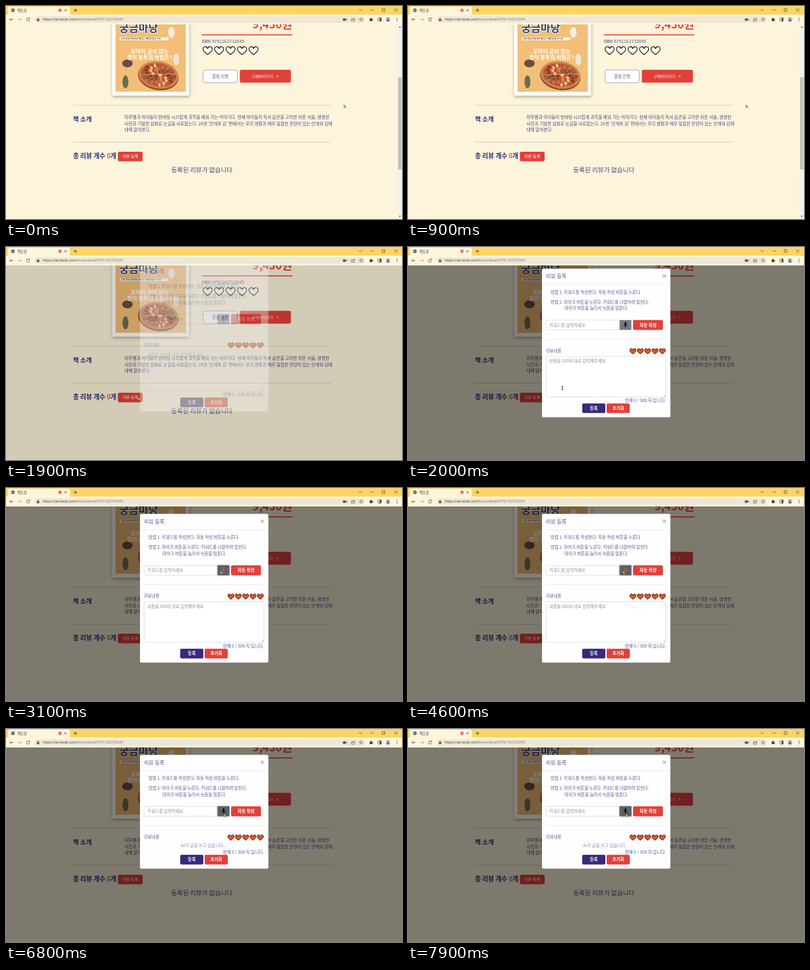
Write an HTML page with a canvas that moves like this. It is 600x323 px and loops after 8000 ms.

```html
<!DOCTYPE html>
<html lang="ko">
<head>
<meta charset="utf-8">
<title>책또랑</title>
<style>
html, body { margin: 0; width: 100%; height: 100%; overflow: hidden; background: #fcf4db; }
canvas { display: block; width: 600px; height: 323px; }
</style>
</head>
<body>
<canvas id="stage"></canvas>
<script>
const W = 600, H = 323, LOOP = 8000;
const OPEN = 1850, RECORD = 2950, STOP = 6350, WRITING = 6500;
const KR = '"Noto Sans CJK KR", "Noto Sans CJK", sans-serif';
const UI = '"Open Sans", sans-serif';
const PAGE = '#fcf4db', NAVY = '#30297a', BODY = '#4d4783', PURPLE = '#5b5296', RED = '#e2403a', INK = '#4f4a40';

const scale = window.devicePixelRatio || 1;

function prepare(canvas) {
  canvas.width = W * scale;
  canvas.height = H * scale;
  const ctx = canvas.getContext('2d');
  ctx.scale(scale, scale);
  return ctx;
}

const stage = prepare(document.getElementById('stage'));
const layer = prepare(document.createElement('canvas'));
let c = stage;

const clamp = v => Math.max(0, Math.min(1, v));
const easeInOut = p => p * p * (3 - 2 * p);

function text(s, x, y, size, color, { weight = 400, align = 'left', font = KR } = {}) {
  c.font = `${weight} ${size}px ${font}`;
  c.textAlign = align;
  c.fillStyle = color;
  c.fillText(s, x, y);
}

function box(x, y, w, h, fill, r = 0, stroke, lw = 0.7) {
  c.beginPath();
  c.roundRect(x, y, w, h, r);
  if (fill) { c.fillStyle = fill; c.fill(); }
  if (stroke) { c.strokeStyle = stroke; c.lineWidth = lw; c.stroke(); }
}

function oval(x, y, rx, ry, fill, angle = 0) {
  c.beginPath();
  c.ellipse(x, y, rx, ry, angle, 0, 7);
  c.fillStyle = fill;
  c.fill();
}

function ring(x, y, r, color, lw = 0.8) {
  c.beginPath();
  c.arc(x, y, r, 0, 7);
  c.strokeStyle = color;
  c.lineWidth = lw;
  c.stroke();
}

function line(color, lw, ...p) {
  c.beginPath();
  for (let i = 0; i < p.length; i += 2) c.lineTo(p[i], p[i + 1]);
  c.strokeStyle = color;
  c.lineWidth = lw;
  c.stroke();
}

function poly(fill, ...p) {
  c.beginPath();
  for (let i = 0; i < p.length; i += 2) c.lineTo(p[i], p[i + 1]);
  c.closePath();
  c.fillStyle = fill;
  c.fill();
}

function button(label, x, y, w, h, fill, size, { color = '#fff', weight = 500, r = 2, stroke } = {}) {
  box(x, y, w, h, fill, r, stroke);
  text(label, x + w / 2, y + h / 2 + size * 0.37, size, color, { weight, align: 'center' });
}

function heart(x, y, w, fill, lw) {
  const k = w / 2;
  c.beginPath();
  c.moveTo(x, y + k * 0.88);
  c.bezierCurveTo(x - k * 0.5, y + k * 0.5, x - k, y + k * 0.15, x - k, y - k * 0.3);
  c.bezierCurveTo(x - k, y - k, x - k * 0.2, y - k * 1.05, x, y - k * 0.42);
  c.bezierCurveTo(x + k * 0.2, y - k * 1.05, x + k, y - k, x + k, y - k * 0.3);
  c.bezierCurveTo(x + k, y + k * 0.15, x + k * 0.5, y + k * 0.5, x, y + k * 0.88);
  c.closePath();
  c.fillStyle = fill;
  c.fill();
  c.strokeStyle = '#15110f';
  c.lineWidth = lw;
  c.lineJoin = 'round';
  c.stroke();
}

function drawBrowser() {
  box(0, 0, W, 13.5, '#fbd463');
  box(3, 1, 94, 16, '#fef5dc', 3);
  box(0, 13, W, 15, '#fef5dc');
  oval(10.5, 6.5, 2.8, 2.8, '#5c5f63');
  line('#fef5dc', 0.5, 8, 6.5, 13, 6.5);
  text('책또랑', 17, 8.5, 5.3, '#3c3a36');
  ring(81.8, 6.5, 2.4, '#d9453a', 0.7);
  oval(81.8, 6.5, 1.4, 1.4, '#d9453a');
  line(INK, 0.8, 88.5, 4.8, 91.9, 8.2);
  line(INK, 0.8, 91.9, 4.8, 88.5, 8.2);
  line(INK, 0.9, 102.5, 6.5, 108, 6.5);
  line(INK, 0.9, 105.2, 3.8, 105.2, 9.2);

  line(INK, 0.7, 534.5, 5, 536.8, 7.3, 539, 5);
  line(INK, 0.7, 552.5, 6, 557.5, 6);
  box(570, 4, 4, 4, null, 0, INK);
  line(INK, 0.7, 588, 3.6, 593, 8.6);
  line(INK, 0.7, 593, 3.6, 588, 8.6);

  line(INK, 0.75, 11.2, 20.5, 5.8, 20.5);
  line(INK, 0.75, 8, 18.3, 5.8, 20.5, 8, 22.7);
  line('#aaa391', 0.75, 18.3, 20.5, 23.7, 20.5);
  line('#aaa391', 0.75, 21.5, 18.3, 23.7, 20.5, 21.5, 22.7);
  c.beginPath();
  c.arc(33.5, 20.5, 2.4, 0.2, 5.4);
  c.strokeStyle = INK;
  c.lineWidth = 0.75;
  c.stroke();
  poly(INK, 34.2, 19.8, 36.3, 19.8, 36.3, 17.6);

  box(43.5, 15.5, 500, 10, '#eee7d5', 5);
  box(46.8, 19.8, 3.6, 3.2, '#5d5a52', 0.5);
  ring(48.6, 19.4, 1.2, '#5d5a52', 0.6);
  text('https://ae-book.com', 56, 22.4, 5.3, '#37352f', { font: UI });
  const host = c.measureText('https://ae-book.com').width;
  text('/book/detail/9791162732045', 56 + host, 22.4, 5.3, '#77736a', { font: UI });

  box(510.5, 18.8, 4, 3.6, '#55524b', 0.6);
  poly('#55524b', 514, 20.6, 516.3, 19, 516.3, 22.2);
  box(523.5, 19.5, 4.5, 3.5, null, 0, '#55524b');
  line('#55524b', 0.7, 525, 21, 528.5, 17.8);
  const star = [];
  for (let i = 0; i < 11; i++) {
    const r = i % 2 ? 1.3 : 2.8, a = i * Math.PI / 5 - Math.PI / 2;
    star.push(538 + r * Math.cos(a), 20.5 + r * Math.sin(a));
  }
  line('#55524b', 0.6, ...star);
  box(551, 19, 4, 4, '#4c4942', 0.8);
  oval(553, 18.8, 1, 1, '#4c4942');
  oval(555.2, 21, 1, 1, '#4c4942');
  box(563.5, 18, 5, 5, null, 0.5, '#4c4942');
  box(566, 18, 2.5, 5, '#4c4942');
  oval(578.8, 20.5, 3.8, 3.8, '#c6d3dd');
  oval(578.8, 19.4, 1.3, 1.3, '#52677c');
  box(576.6, 21, 4.4, 2.3, '#52677c', 1);
  for (let i = 0; i < 3; i++) oval(592.5, 18.4 + i * 2.1, 0.65, 0.65, INK);
}

function drawCover() {
  c.save();
  c.shadowColor = 'rgba(60,45,25,.45)';
  c.shadowBlur = 5 * scale;
  c.shadowOffsetY = 1.5 * scale;
  box(160.5, 10, 117, 126, '#fffdf8');
  c.restore();
  box(166, 20, 106.5, 110, '#f3be78');

  c.font = `700 16px ${KR}`;
  c.textAlign = 'left';
  c.lineWidth = 1.6;
  c.strokeStyle = '#fff';
  c.strokeText('궁금마당', 171.5, 38.5);
  text('궁금마당', 171.5, 38.5, 16, '#343c63', { weight: 700 });
  box(172, 47.5, 74, 4.6, '#fffaf0');
  text('우리 동네 이야기로 배우는 재미난 탐구 시간', 174, 51, 3.4, '#514a48', { weight: 700 });

  oval(250.5, 40, 5, 8, '#f4eee4');
  oval(258, 81, 4.5, 9, '#ede5d5');
  oval(184, 87, 8, 6, '#674e42');
  oval(181, 115, 4.5, 10, '#68704a');
  text('호떡이 굳지 않는', 217.5, 72, 8.4, '#fff', { weight: 700, align: 'center' });
  text('종이 봉투의 마법은?', 217.5, 81, 8.2, '#fff', { weight: 700, align: 'center' });

  c.save();
  c.translate(231, 104.5);
  c.rotate(0.16);
  oval(0, 2, 31, 21, '#8e4f30');
  oval(0, 0, 30.5, 20.5, '#c9874f');
  oval(0, 0, 27, 17.5, '#bd5638');
  for (let i = 0; i < 36; i++) {
    const a = i * 2.4, r = Math.sqrt((i + 0.5) / 36);
    const tone = ['#efc88a', '#8c2f22', '#5f6238', '#d9714a'][i % 4];
    oval(25 * r * Math.cos(a), 15.5 * r * Math.sin(a), 2.7, 1.8, tone, a);
  }
  line('#f1cf8d', 0.7, -26, 4, 26, -6);
  line('#f1cf8d', 0.7, -9, -17, 11, 17);
  c.restore();
}

function drawPage(scrollbar) {
  box(0, 28, W, H - 28, PAGE);
  drawCover();

  text('9,430원', 433.5, 34, 16.7, RED, { weight: 700, align: 'right' });
  line(RED, 1.5, 296.5, 43.8, 434, 43.8);
  text('ISBN', 296.5, 55.5, 6, NAVY, { weight: 500 });
  text('9791162732045', 312, 55.5, 6.8, BODY);
  for (let i = 0; i < 5; i++) heart(305.5 + i * 17.4, 67.6, 13.8, '#fffaee', 1.1);
  button('알림 신청', 298.8, 97, 51.6, 19.2, '#fffefb', 6.4, { color: PURPLE, weight: 400, r: 2.5, stroke: '#8d87b5' });
  box(354.3, 96.7, 77.4, 19.6, RED, 2.5);
  text('구매하러가기', 372, 108.8, 6, '#fff', { weight: 500 });
  line('#fff', 0.6, 409.3, 106.7, 412.8, 106.7);
  line('#fff', 0.6, 411.6, 105.6, 412.8, 106.7, 411.6, 107.8);

  line('#d3cac6', 0.8, 101.5, 150.4, 492, 150.4);
  text('책 소개', 101.5, 174.6, 9.5, NAVY, { weight: 700 });
  [
    '마루쌤과 아이들이 한바탕 시끄럽게 과학을 배워 가는 이야기다. 현재 아이들의 독서 습관을 고려한 쉬운 서술, 생생한',
    "사진과 기발한 삽화로 눈길을 사로잡는다. 29권 '안개와 김' 편에서는 우리 생활과 매우 밀접한 관련이 있는 안개와 김에",
    '대해 알아본다.'
  ].forEach((s, i) => text(s, 179.5, 171.2 + i * 9.4, 6.58, BODY));
  line('#d3cac6', 0.8, 101.5, 206.5, 492, 206.5);

  let x = 101.5;
  for (const [s, color] of [['총 리뷰 개수 ', NAVY], ['0', '#e8532f'], ['개', NAVY]]) {
    text(s, x, 231.4, 9.7, color, { weight: 700 });
    x += c.measureText(s).width;
  }
  button('리뷰 등록', 169.5, 221, 37.5, 14.4, RED, 6.2, { weight: 400, r: 2.2 });
  text('등록된 리뷰가 없습니다', 296.7, 252.4, 9.65, BODY, { align: 'center' });

  if (scrollbar) {
    box(593.5, 28, 6.5, H - 28, '#f3f1ec');
    box(594, 108, 5.5, 140, '#c3c1bd');
    poly('#55534f', 595.2, 33, 598.4, 33, 596.8, 31);
    poly('#55534f', 595.2, 318, 598.4, 318, 596.8, 320);
  }
}

function drawMic(color) {
  box(328, 120.3, 3, 5.4, color, 1.5);
  c.beginPath();
  c.arc(329.5, 124.4, 2.6, 0, Math.PI);
  c.strokeStyle = color;
  c.lineWidth = 0.8;
  c.stroke();
  line(color, 0.9, 329.5, 127, 329.5, 128.8);
}

function drawModal(t) {
  const writing = t >= WRITING;
  const dy = writing ? -53 : 0;
  const focused = t >= RECORD;

  box(203, 39.2, 194.5, 225.6 + dy, '#fffefe', 2);
  text('리뷰 등록', 209, 54, 8, PURPLE, { weight: 500 });
  line('#716d78', 0.9, 386.2, 48.2, 390.6, 52.6);
  line('#716d78', 0.9, 390.6, 48.2, 386.2, 52.6);
  line('#e4e2e7', 0.6, 203, 63.5, 397.5, 63.5);

  text('방법 1. 키워드를 작성한다. 자동 작성 버튼을 누른다.', 216, 77.2, 6.45, PURPLE);
  text('방법 2. 마이크 버튼을 누른다. 키워드를 나열하며 말한다.', 216, 92.4, 6.45, PURPLE);
  text('마이크 버튼을 눌러서 녹음을 멈춘다.', 237, 102, 6.45, PURPLE);

  box(209.3, 117.4, 111.5, 14.8, '#fff', 1.5, '#d2d4da');
  text('키워드를 입력하세요.', 214, 127.2, 6.4, '#8b8d96');
  if (focused) box(319.4, 116.2, 20, 17.2, '#c0c4c8', 2);
  box(320.6, 117.3, 17.8, 15, focused ? '#596068' : '#747b83', 1);
  drawMic(t >= RECORD && t < STOP ? '#e5402f' : '#101114');
  button('자동 작성', 341, 117.2, 45.3, 15.2, RED, 6.6, { weight: 700 });
  line('#e4e2e7', 0.6, 209, 146.5, 391, 146.5);

  text('리뷰내용', 209, 166.2, 6.3, PURPLE);
  for (let i = 0; i < 5; i++) heart(340.8 + i * 11.15, 164.6, 9.2, '#f4511e', 0.9);

  if (writing) {
    text('AI가 글을 쓰고 있습니다...', 300, 179.4, 6.5, '#8a84b4', { align: 'center' });
  } else {
    box(209.3, 172.6, 181.6, 61.4, '#fff', 1.5, '#d2d4da');
    text('내용을 300자 내로 입력해주세요.', 214, 181.8, 6.4, '#8b8d96');
    line('#777', 0.5, 387.5, 233, 390, 230.5);
    line('#777', 0.5, 389, 233, 390, 232);
  }
  text('현재 0 / 300 자 입니다.', 391, 241.5 + dy, 6.55, PURPLE, { align: 'right' });
  button('등록', 264, 243.8 + dy, 35, 14.6, '#372a7c', 6.4, { weight: 700, r: 1.8 });
  button('초기화', 301, 243.8 + dy, 35, 14.6, RED, 6.4, { weight: 700, r: 1.8 });
}

// Pointer stops: time, x, y
const path = [
  [0, 513, 152], [1000, 513, 152], [1750, 201, 230], [1900, 201, 230], [2000, 234, 214],
  [2250, 234, 214], [2850, 326, 128], [6200, 327, 128], [6450, 331, 131], [LOOP, 331, 131]
];

function pointerAt(t) {
  let i = 1;
  while (i < path.length - 1 && path[i][0] < t) i++;
  const [t0, x0, y0] = path[i - 1], [t1, x1, y1] = path[i];
  const p = easeInOut(clamp((t - t0) / (t1 - t0)));
  return [x0 + (x1 - x0) * p, y0 + (y1 - y0) * p];
}

function drawPointer(t) {
  const [x, y] = pointerAt(t);
  const inField = t > OPEN + 140 && x > 209 &&
    ((x < 391 && y > 172 && y < 234) || (x < 320 && y > 117 && y < 132));
  if (inField) {
    line('#222', 0.9, x, y - 2.6, x, y + 2.6);
    line('#222', 0.7, x - 1.5, y - 2.7, x + 1.5, y - 2.7);
    line('#222', 0.7, x - 1.5, y + 2.7, x + 1.5, y + 2.7);
    return;
  }
  const shape = [-1, -2, -0.6, 2, 0.3, 1.2, 1.4, 2.6, 2, 2, 1.1, 0.7, 2, 0.2];
  c.save();
  c.translate(x, y);
  c.lineJoin = 'round';
  line('#4a5420', 0.9, ...shape, shape[0], shape[1]);
  poly('#c8d820', ...shape);
  c.restore();
}

// Solves the ease-out curve cubic-bezier(0, 0, .58, 1)
function easeOut(p) {
  let lo = 0, hi = 1;
  for (let i = 0; i < 20; i++) {
    const m = (lo + hi) / 2;
    if (3 * (1 - m) * m * m * 0.58 + m ** 3 < p) lo = m; else hi = m;
  }
  return 3 * lo * lo - 2 * lo ** 3;
}

// The dialog fades as one piece, so it is composed on its own layer
function drawDialog(t) {
  const fade = clamp((t - OPEN) / 150);
  box(0, 28, W, H - 28, `rgba(0,0,0,${fade * 0.5})`);
  c = layer;
  c.clearRect(0, 0, W, H);
  c.save();
  c.translate(0, -21 * (1 - easeOut(clamp((t - OPEN) / 300))));
  drawModal(t);
  c.restore();
  c = stage;
  c.globalAlpha = fade;
  c.drawImage(layer.canvas, 0, 0, W, H);
  c.globalAlpha = 1;
}

function render(t) {
  drawPage(t < OPEN);
  if (t >= OPEN) drawDialog(t);
  drawBrowser();
  drawPointer(t);
}

const start = performance.now();
function tick() {
  render((performance.now() - start) % LOOP);
  requestAnimationFrame(tick);
}
tick();
</script>
</body>
</html>
```
